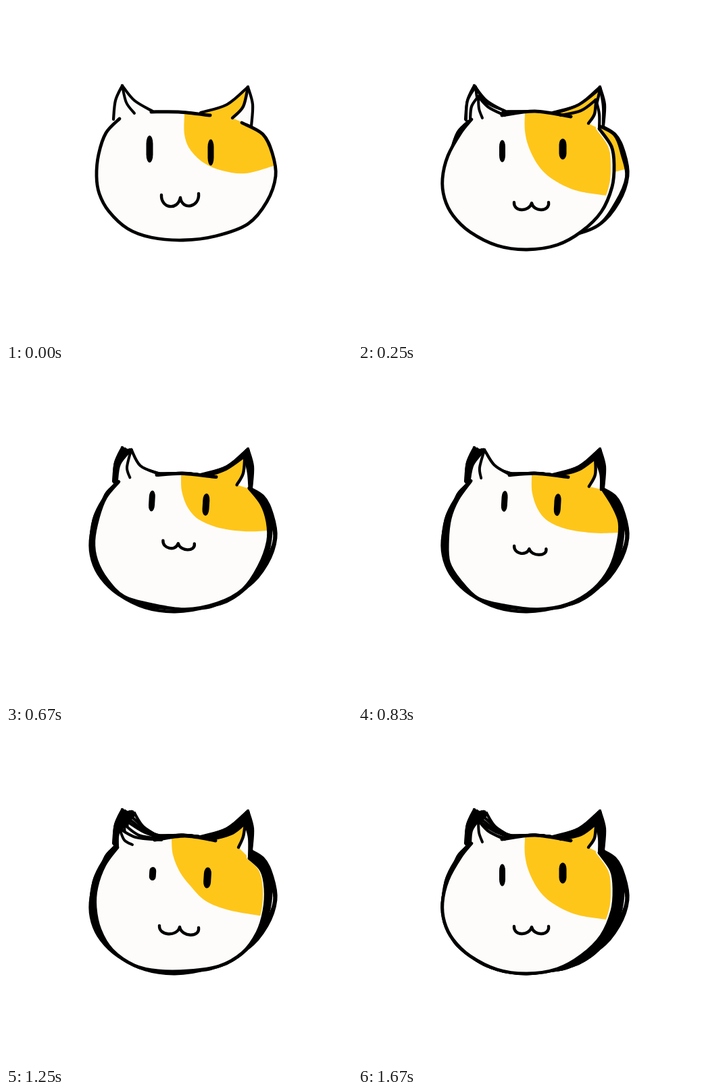
These frames come from a looping animation (512 by 495 pixels, 1760 ms). An HTML page with a canvas:

```html
<!DOCTYPE html>
<html lang="en">
<head>
<meta charset="utf-8">
<title>Cat</title>
<style>
  html, body { margin: 0; width: 100%; height: 100%; overflow: hidden; background: #fff; }
  canvas { display: block; }
</style>
</head>
<body>
<canvas id="stage" width="512" height="495"></canvas>
<script>
const ctx = document.getElementById('stage').getContext('2d');
const LOOP = 1760, STEPS = 20;
const INK = '#000', FUR = '#fdfcfb', ORANGE = '#ffc61a';

// Each pose: flat x,y lists for the lines; eyes are centres,
// lids are rx,ry per eye plus tilt, mouth is left, cusp, right, depth.
const rest = {
  body: [168,167,148,188,137,220,134,252,138,278,152,304,180,330,215,343,262,347,310,341,358,323,386,290,399,252,394,218,380,190,349,173],
  earL: [159,168,162,140,172,118,190,140,217,156], inL: [178,143,190,159],
  earR: [288,158,327,146,358,120,365,146,363,178], inR: [351,149,335,166],
  top: [215,157,255,157,302,162],
  patch: [264,161,264,190,272,212,292,232,320,244,355,248,396,237],
  eyes: [212.5,212,303,217], lids: [5,20,4.5,19.5,0],
  mouth: [230,280,258,284,285,278,20], gap: 0, tongue: 0
};
const turn = {
  body: [168,168,152,188,133,222,125,256,128,285,141,311,166,335,206,355,250,361,295,354,331,334,360,305,376,268,379,235,375,208,357,182],
  earL: [166,169,168,149,178,134,193,150,217,162], inL: [179,152,184,166],
  earR: [300,162,330,155,352,139,357,160,357,182], inR: [350,160,341,174],
  top: [213,162,262,156,315,164],
  patch: [247,160,247,185,253,210,268,238,290,258,325,274,376,282],
  eyes: [213.5,215,303,212], lids: [4.5,16.5,5.5,15.5,0],
  mouth: [231,291,257,292,282,291,14], gap: 5, tongue: 0
};
const blink = {
  body: [166,168,150,186,133,216,126,250,130,280,145,308,170,333,205,347,265,354,318,349,355,326,380,292,391,255,390,222,380,198,355,175],
  earL: [161,168,165,142,176,120,194,145,228,158], inL: [176,146,187,160],
  earR: [295,159,325,149,356,122,361,145,361,180], inR: [351,150,341,166],
  top: [220,158,265,157,311,161],
  patch: [265,160,268,180,280,203,305,222,345,234,370,235,392,232],
  eyes: [213.5,195.5,298,201.5], lids: [15,4.5,15,5,.04],
  mouth: [236,231,259,236,280,237,14], gap: 0, tongue: 1
};
const lean = {
  body: [166,168,148,195,137,226,133,258,137,290,151,318,180,342,222,355,265,358,310,350,346,329,372,295,384,260,385,230,378,205,361,180],
  earL: [164,168,172,142,190,123,203,143,226,158], inL: [181,148,181,164],
  earR: [300,159,328,150,350,138,358,160,361,180], inR: [351,160,342,178],
  top: [225,159,262,156,311,162],
  patch: [255,161,255,185,262,210,275,228,300,240,345,247,386,247],
  eyes: [217.5,198,294.5,203], lids: [4.5,15.5,5,16.5,.06],
  mouth: [230,272,252,276,278,276,11], gap: 0, tongue: 0
};
const drop = {
  body: [168,170,151,198,140,229,136,260,140,290,152,318,176,338,215,350,260,354,310,350,346,332,370,302,382,265,382,232,375,206,360,183],
  earL: [168,172,170,154,180,136,204,151,235,162], inL: [180,158,193,170],
  earR: [296,164,330,151,352,137,360,160,364,184], inR: [348,160,339,176],
  top: [232,162,265,158,304,166],
  patch: [245,162,247,182,258,205,275,228,300,247,335,262,384,268],
  eyes: [217,211.5,301,221.5], lids: [5,17.5,6,17.5,.06],
  mouth: [226,288,255,293,287,294,12], gap: 0, tongue: 0
};
const wink = {
  body: [165,174,146,200,134,233,132,263,139,296,157,326,190,349,225,357,270,357,315,350,350,330,372,300,382,268,384,235,378,208,360,190],
  earL: [165,174,165,158,168,146,192,159,230,163], inL: [175,163,187,170],
  earR: [305,162,335,153,354,138,360,160,360,190], inR: [351,158,344,174],
  top: [220,163,265,157,310,164],
  patch: [245,162,247,185,257,210,272,230,295,253,330,267,381,276],
  eyes: [217,213,298,219], lids: [5,10,5.5,15.5,.06],
  mouth: [227,290,257,292,285,293,15], gap: 4, tongue: 0
};

const WOBBLY = ['body', 'earL', 'earR'];
const HELD = ['lids', 'gap', 'tongue'];

function mix(a, b, t, seed = 0) {
  const out = {};
  for (const part in a) {
    if (HELD.includes(part)) { out[part] = (t < .5 ? a : b)[part]; continue; }
    const shake = WOBBLY.includes(part) ? 1.2 : 0;
    out[part] = a[part].map((v, j) =>
      v + (b[part][j] - v) * t + shake * Math.sin(seed * 7.3 + j * 1.9));
  }
  return out;
}

const keys = [[0, rest], [1, mix(rest, turn, .12)], [2, turn], [4, blink],
              [9, lean], [12, drop], [14, wink], [19, turn]];

function poseAt(step) {
  const n = keys.findIndex(k => k[0] >= step);
  const [end, b] = keys[n];
  if (end === step) return b;
  const [start, a] = keys[n - 1];
  return mix(a, b, (step - start) / (end - start), step);
}
const poses = Array.from({ length: STEPS }, (_, i) => poseAt(i));

const pairs = flat => flat.reduce((p, v, i) => (i % 2 ? p[p.length - 1].push(v) : p.push([v]), p), []);

// Catmull-Rom curve through the points, appended to a path.
function curve(path, pts, join) {
  path[join ? 'lineTo' : 'moveTo'](...pts[0]);
  for (let i = 0; i < pts.length - 1; i++) {
    const p = pts[i - 1] || pts[i], a = pts[i], b = pts[i + 1], n = pts[i + 2] || b;
    path.bezierCurveTo(a[0] + (b[0] - p[0]) / 6, a[1] + (b[1] - p[1]) / 6,
                       b[0] - (n[0] - a[0]) / 6, b[1] - (n[1] - a[1]) / 6, ...b);
  }
}

function line(pts, width) {
  const path = new Path2D();
  curve(path, pts);
  ctx.lineWidth = width;
  ctx.stroke(path);
}

function fill(path, color) {
  ctx.fillStyle = color;
  ctx.fill(path);
}

function drawPatch(pose, head, earBack, inner) {
  ctx.save();
  ctx.clip(head);
  ctx.save();
  ctx.translate(-pose.gap, 0);
  ctx.clip(head);
  ctx.translate(pose.gap, 0);
  const pts = pairs(pose.patch), patch = new Path2D();
  curve(patch, pts);
  patch.lineTo(430, pts[pts.length - 1][1]);
  patch.lineTo(430, 90);
  patch.lineTo(pts[0][0], 90);
  fill(patch, ORANGE);
  ctx.restore();
  const hollow = new Path2D();
  curve(hollow, inner);
  curve(hollow, [...earBack].reverse(), true);
  fill(hollow, FUR);
  ctx.restore();
}

function drawEye(x, y, rx, ry, tilt) {
  ctx.save();
  ctx.translate(x, y);
  ctx.rotate(tilt);
  const eye = new Path2D();
  const flat = rx > ry;
  eye.roundRect(-rx, -ry, rx * 2, ry * 2, { x: rx * (flat ? .6 : 1), y: ry * (flat ? 1 : .6) });
  fill(eye, INK);
  ctx.restore();
}

function drawMouth([lx, ly, cx, cy, rx, ry, d], tongue) {
  const m = new Path2D();
  m.moveTo(lx, ly);
  m.bezierCurveTo(lx - 1, ly + d, cx - 4, cy + d, cx, cy);
  m.bezierCurveTo(cx + 3, cy + d, rx + 2, ry + d, rx, ry);
  ctx.lineWidth = 4.4;
  ctx.stroke(m);
  if (tongue) line([[cx - 10, cy + 10], [cx - 8, cy + 23], [cx - 2, cy + 32], [cx + 4, cy + 23], [cx + 6, cy + 10]], 3.8);
}

function drawCat(pose) {
  const body = pairs(pose.body), top = pairs(pose.top);
  const earL = pairs(pose.earL), earR = pairs(pose.earR);
  const inL = [earL[2], ...pairs(pose.inL)], inR = [earR[2], ...pairs(pose.inR)];
  const sides = [earL.slice(0, 3), earL.slice(2), earR.slice(0, 3), earR.slice(2)];

  const head = new Path2D();
  curve(head, body);
  [sides[3], sides[2], top, sides[1], sides[0]].forEach((s, i) => {
    const back = [...s].reverse();
    curve(head, i === 2 ? back.slice(1, 2) : back, true);
  });
  head.closePath();

  fill(head, FUR);
  drawPatch(pose, head, sides[3], inR);

  ctx.strokeStyle = INK;
  ctx.lineCap = ctx.lineJoin = 'round';
  line(body, 4.8);
  sides.forEach(s => line(s, 4.2));
  line(inL, 4);
  line(inR, 4.4);
  line(top, 5);

  const [x1, y1, x2, y2] = pose.eyes, [rx1, ry1, rx2, ry2, tilt] = pose.lids;
  drawEye(x1, y1, rx1, ry1, tilt);
  drawEye(x2, y2, rx2, ry2, tilt);
  drawMouth(pose.mouth, pose.tongue);
}

// The first pose holds longer; the rest run at twelve per second on a 10 ms grid.
const startOf = i => i && Math.round((170 + (i - 1) * 250 / 3) / 10) * 10;

const begin = performance.now();
let shown = -1;

function tick() {
  const t = (performance.now() - begin) % LOOP;
  let step = STEPS - 1;
  while (startOf(step) > t) step--;
  if (step !== shown) {
    // Earlier drawings stay underneath, so the outlines pile up.
    ctx.clearRect(0, 0, 512, 495);
    for (let i = 0; i <= step; i++) drawCat(poses[i]);
    shown = step;
  }
  requestAnimationFrame(tick);
}
tick();
</script>
</body>
</html>
```
